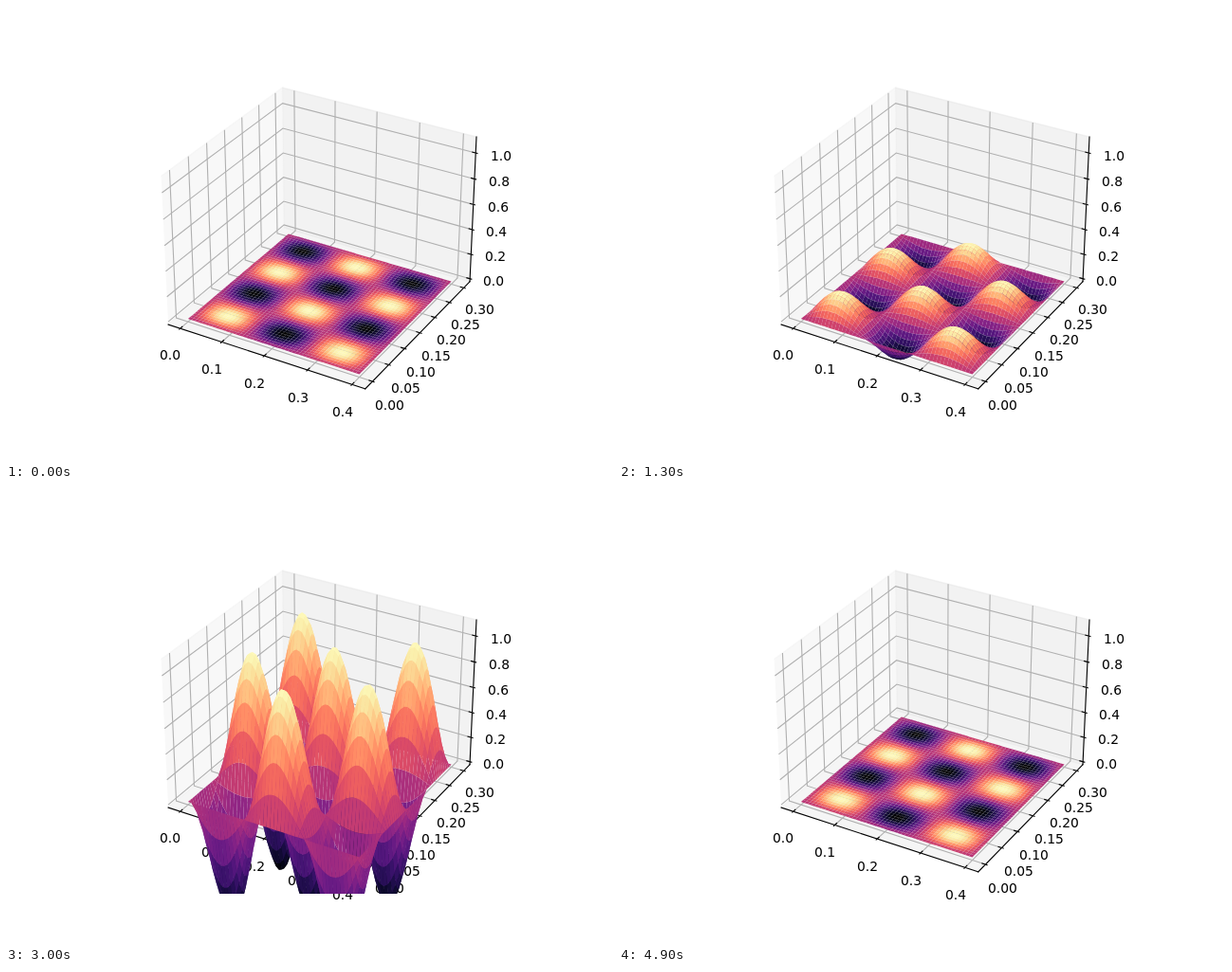
These frames come from a looping animation (640x480 px, 5 s). An HTML page with a canvas:

```html
<!DOCTYPE html>
<html lang="en">
<head>
<meta charset="utf-8">
<title>Vibrating membrane</title>
<style>
  html, body { margin: 0; width: 100%; height: 100%; overflow: hidden; background: #fff; }
  svg, canvas { position: absolute; left: 0; top: 0; width: 640px; height: 480px; }
  text { font: 13.889px "DejaVu Sans", sans-serif; fill: #000; }
  .pane { fill-opacity: .5; stroke-opacity: .5; stroke-width: 1.389; }
  .grid { fill: none; stroke: #b0b0b0; stroke-width: 1.111; }
  .axis { fill: none; stroke: #000; stroke-width: 1.111; stroke-linecap: square; }
</style>
</head>
<body>
<svg id="axes" viewBox="0 0 640 480"></svg>
<canvas id="surface" width="640" height="480"></canvas>
<script>
(() => {
const LX = 0.4, LY = 0.3, CELLS = 49;
const FRAME = 100, FRAMES = 50;

// Box of 4:4:3, seen in perspective from elevation 30, azimuth -60
const UNIT = 1.8294640721620434 / Math.sqrt(41);
const SIZE = [4 * UNIT, 4 * UNIT, 3 * UNIT];
const HALF = SIZE.map(s => s / 2 * 25 / 24);
const C30 = Math.sqrt(3) / 2, SCALE = 369.6 / 0.185, DIST = 10;

function project([x, y, z]) {
  const depth = C30 / 2 * x - 0.75 * y + 0.5 * z;
  const k = SCALE / (DIST - depth);
  return [333 + k * (C30 * x + 0.5 * y),
          237.4 - k * (-0.25 * x + C30 / 2 * y + C30 * z), depth];
}

// Data value to box coordinate
const toX = v => (v - LX / 2) / (LX * 1.1) * SIZE[0];
const toY = v => (v - LY / 2) / (LY * 1.1) * SIZE[1];
const toZ = v => (v - 0.55) / 1.1 * SIZE[2];

const svg = document.getElementById("axes");

function add(tag, attrs, text) {
  const el = document.createElementNS("http://www.w3.org/2000/svg", tag);
  for (const key in attrs) el.setAttribute(key, attrs[key]);
  if (text) el.textContent = text;
  svg.append(el);
}

function line(cls, pts, extra) {
  const points = pts.map(p => project(p).slice(0, 2).map(v => v.toFixed(2)).join()).join(" ");
  add("polyline", { class: cls, points, ...extra });
}

function label(pos, text) {
  const [x, y] = project(pos);
  const width = (0.636 * (text.length - 1) + 0.318) * 13.889;
  add("text", { x: Math.round(x - width / 2), y: Math.round(y + 11) }, text);
}

const [X, Y, Z] = HALF;
const TICK = SIZE[0] / 12, IN = 0.2 * TICK, OUT = 0.1 * TICK;
const PAD = 1.037 * TICK, PADZ = PAD * 0.75;

function drawAxes() {
  const pane = (pts, grey) => line("pane", pts, { fill: grey, stroke: grey });
  pane([[-X, -Y, -Z], [-X, Y, -Z], [-X, Y, Z], [-X, -Y, Z]], "rgb(242,242,242)");
  pane([[-X, Y, -Z], [X, Y, -Z], [X, Y, Z], [-X, Y, Z]], "rgb(230,230,230)");
  pane([[-X, -Y, -Z], [X, -Y, -Z], [X, Y, -Z], [-X, Y, -Z]], "rgb(236,236,236)");

  const axis = (ends, count, step, digits, parts) => {
    const values = Array.from({ length: count }, (_, i) => i * step);
    line("axis", ends);
    values.forEach(v => line("grid", parts(v).grid));
    values.forEach(v => {
      line("axis", parts(v).tick);
      label(parts(v).text, v.toFixed(digits));
    });
  };
  axis([[-X, -Y, -Z], [X, -Y, -Z]], 5, 0.1, 1, v => {
    const x = toX(v);
    return { grid: [[x, -Y, -Z], [x, Y, -Z], [x, Y, Z]],
             tick: [[x, -Y - OUT, -Z], [x, -Y + IN, -Z]],
             text: [x, -Y - PAD, -Z - PADZ] };
  });
  axis([[X, -Y, -Z], [X, Y, -Z]], 7, 0.05, 2, v => {
    const y = toY(v);
    return { grid: [[X, y, -Z], [-X, y, -Z], [-X, y, Z]],
             tick: [[X + OUT, y, -Z], [X - IN, y, -Z]],
             text: [X + PAD, y, -Z - PADZ] };
  });
  axis([[X, Y, -Z], [X, Y, Z]], 6, 0.2, 1, v => {
    const z = toZ(v);
    return { grid: [[-X, -Y, z], [-X, Y, z], [X, Y, z]],
             tick: [[X + OUT, Y, z], [X - IN, Y, z]],
             text: [X + PAD, Y + PAD, z] };
  });
}

// Polynomial fit of the magma colour map, one row per channel
const MAGMA = [
  [-0.00214, 0.25166, 8.35372, -27.66873, 52.17614, -50.76853, 18.65571],
  [-0.00075, 0.67752, -3.57772, 14.26473, -27.94361, 29.04658, -11.48977],
  [-0.00539, 2.49403, 0.31447, -13.64921, 12.94417, 4.23415, -5.60196]
];
function magma(t) {
  const rgb = MAGMA.map(c => {
    const v = c.reduceRight((sum, k) => sum * t + k, 0);
    return Math.round(255 * Math.min(1, Math.max(0, v)));
  });
  return `rgb(${rgb})`;
}

// Standing wave with 3 by 4 half waves
const N = CELLS + 1;
const nodes = [];
for (let j = 0; j < N; j++) {
  for (let i = 0; i < N; i++) {
    const u = i / CELLS, v = j / CELLS;
    nodes.push({ x: toX(u * LX), y: toY(v * LY),
                 h: Math.sin(3 * Math.PI * u) * Math.sin(4 * Math.PI * v) });
  }
}
const cells = [];
for (let j = 0; j < CELLS; j++) {
  for (let i = 0; i < CELLS; i++) {
    const a = j * N + i;
    const ids = [a, a + 1, a + N + 1, a + N];
    cells.push({ ids, mean: ids.reduce((s, k) => s + nodes[k].h, 0) / 4 });
  }
}
const peak = Math.max(...cells.map(c => c.mean));
for (const c of cells) {
  c.up = magma(0.5 + c.mean / peak / 2);
  c.down = magma(0.5 - c.mean / peak / 2);
}

const ctx = document.getElementById("surface").getContext("2d");
ctx.beginPath();
ctx.rect(143, 58, 370, 369);
ctx.clip();

function drawSurface(n) {
  const amp = -Math.sin(4 * Math.PI * n / (FRAMES - 1));
  const pts = nodes.map(p => project([p.x, p.y, toZ(amp * p.h)]));
  for (const c of cells) c.depth = c.ids.reduce((s, k) => s + pts[k][2], 0);
  cells.sort((a, b) => a.depth - b.depth);
  ctx.clearRect(0, 0, 640, 480);
  for (const c of cells) {
    ctx.fillStyle = amp < 0 ? c.down : c.up;
    ctx.beginPath();
    for (const k of c.ids) ctx.lineTo(pts[k][0], pts[k][1]);
    ctx.fill();
  }
}

const start = performance.now();
let shown = -1;
function tick() {
  const n = Math.floor((performance.now() - start) / FRAME) % FRAMES;
  if (n !== shown) drawSurface(shown = n);
  requestAnimationFrame(tick);
}
drawAxes();
tick();
})();
</script>
</body>
</html>
```
